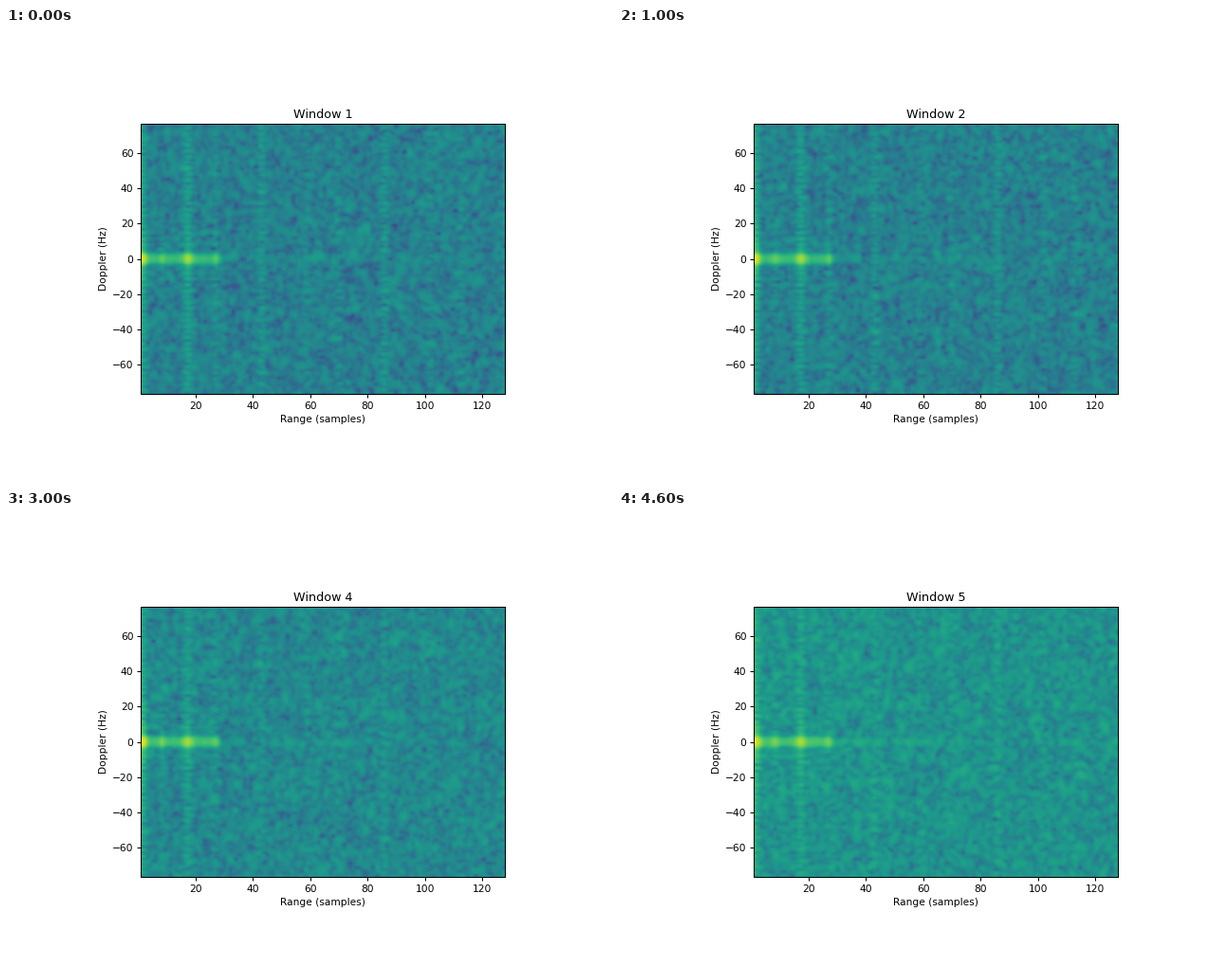
A matplotlib script for the animation above (5000 ms loop, 640 by 480 pixels).

```python
import numpy as np
import matplotlib.pyplot as plt
from matplotlib.animation import FuncAnimation

W, H, DPI = 640, 480, 100
K = 0.768  # text and line scale
WINDOWS = 5
RANGES = np.arange(1, 129)
PULSES = 46
F_MAX = 76.29
PEAK_DB = 51

plt.rcParams.update({
    "font.family": "DejaVu Sans",
    "font.size": 10 * K,
    "axes.titlesize": 12 * K,
    "axes.titlepad": 6 * K,
    "axes.labelpad": 4 * K,
    "axes.linewidth": 0.72,
    "xtick.major.size": 3.5 * K,
    "ytick.major.size": 3.5 * K,
    "xtick.major.width": 0.72,
    "ytick.major.width": 0.72,
    "xtick.major.pad": 4.2 * K,
    "ytick.major.pad": 3.5 * K,
})

t = np.arange(PULSES)
taper = 0.72 - 0.28 * np.cos(2 * np.pi * (t + 0.5) / PULSES)
freq = np.linspace(-0.5, 0.5, 129)
dft = np.exp(-2j * np.pi * np.outer(freq, t))


def bump(center, width):
    return np.exp(-0.5 * ((RANGES - center) / width) ** 2)


def clutter_level():
    """Static echo in dB over the noise: a near shelf with four strong echoes."""
    shelf = 4 + 17 / (1 + np.exp(2.5 * (RANGES - 28.3)))
    fade = 0.08 * np.maximum(RANGES - 40, 0)
    echoes = (29 * bump(1.3, 1.1) + 9 * bump(8, 0.9)
              + 19 * bump(17, 1.3) + 9 * bump(27, 0.8))
    return shelf - fade + echoes


def ridge_profile():
    """Ridges along the Doppler axis, every 43 bins with weaker pairs at +-16."""
    ridges = 3 * bump(1, 1) + 3 * bump(17, 1.2)
    for c in (43, 86, 129):
        ridges += 2.8 * bump(c, 1) + 1.5 * (bump(c - 16, 1) + bump(c + 16, 1))
    return ridges


def doppler_map(i):
    rng = np.random.default_rng(40 + i)
    shape = (PULSES, len(RANGES) + 2)
    raw = rng.normal(size=shape) + 1j * rng.normal(size=shape)
    raw = raw[:, 1:-1] + 0.5 * (raw[:, :-2] + raw[:, 2:])
    noise = dft @ (raw * taper[:, None])
    noise /= np.sqrt(np.mean(np.abs(noise) ** 2))

    level = clutter_level() + rng.normal(0, 1, len(RANGES))
    clutter = np.outer(dft @ taper / taper.sum(), 10 ** (level / 20))

    # The ridges and their stripes weaken after the second window
    strength = 1 / (1 + np.exp(3 * (i - 1.5)))
    depth = 0.25 + 0.6 * strength
    stripes = (1 - depth * np.exp(-2j * np.pi * freq * PULSES)) / (1 + depth)
    ridges = np.outer(stripes, (0.5 + 0.5 * strength) * ridge_profile())

    db = 20 * np.log10(np.abs(noise + clutter + ridges) + 1e-4)
    base = 0.43 + 0.08 * (i / (WINDOWS - 1)) ** 3
    return base + (1 - base) * (db + 2.5) / (PEAK_DB + 2.5)


maps = [doppler_map(i) for i in range(WINDOWS)]

fig = plt.figure(figsize=(W / DPI, H / DPI), dpi=DPI, facecolor="white")
ax = fig.add_axes([142 / W, 94.3 / H, 384.4 / W, 284.4 / H])
image = ax.imshow(maps[0], cmap="viridis", vmin=0, vmax=1, origin="lower",
                  aspect="auto", interpolation="bicubic",
                  extent=[1, 128, -F_MAX, F_MAX])
ax.set_xticks(range(20, 121, 20))
ax.set_yticks(range(-60, 61, 20))
ax.set_xlabel("Range (samples)")
ax.set_ylabel("Doppler (Hz)")
title = ax.set_title("Window 1")


def update(i):
    image.set_data(maps[i])
    title.set_text(f"Window {i + 1}")
    return image, title


anim = FuncAnimation(fig, update, frames=WINDOWS, interval=1000, repeat=True)
plt.show()
```
